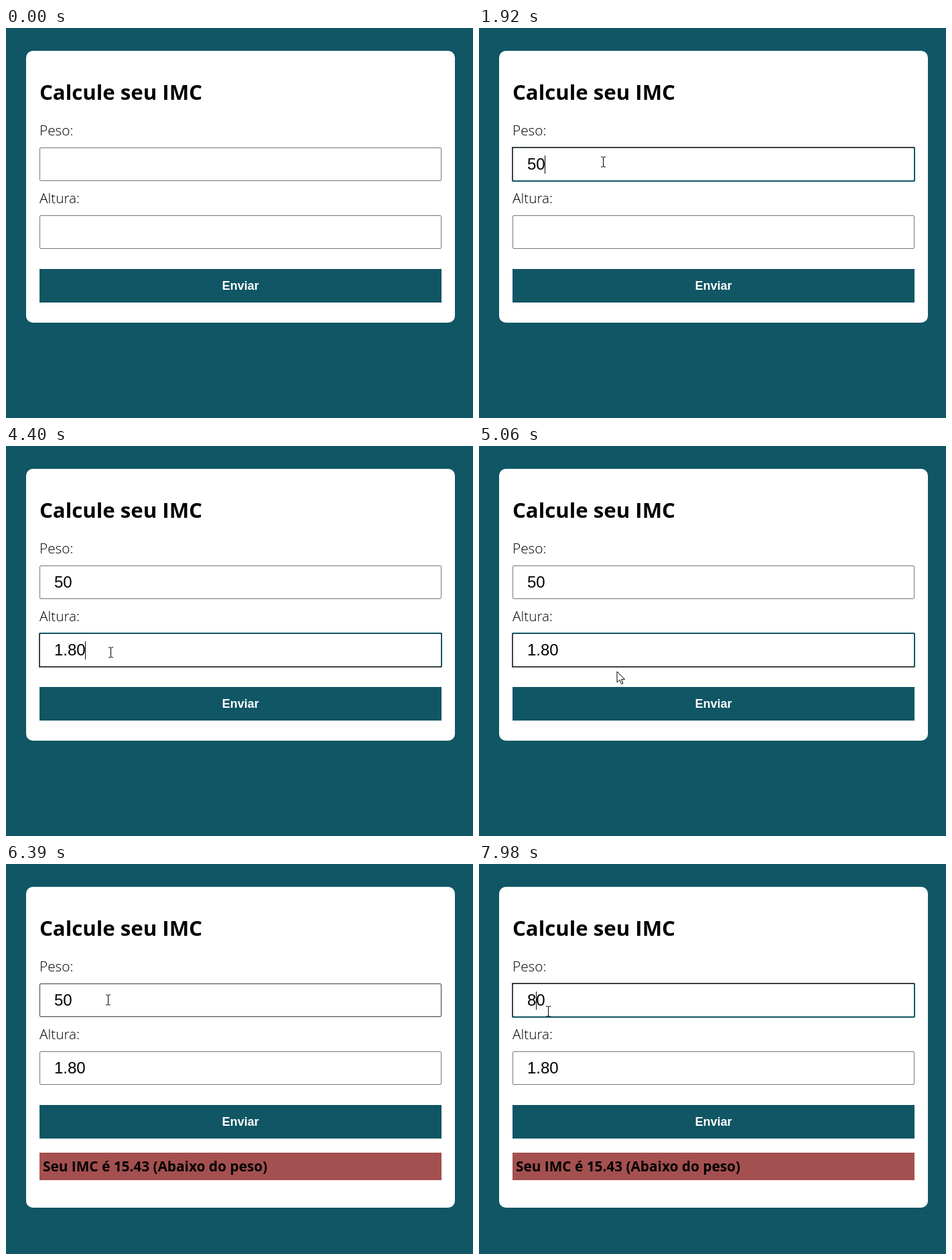
Animation of 697 by 581 pixels, one loop 8000 ms. Source, as an HTML page:

```html
<!DOCTYPE html>
<html lang="pt-BR">
<head>
<meta charset="utf-8">
<title>Calcule seu IMC</title>
<style>
html, body { margin: 0; width: 100%; height: 100%; overflow: hidden; background: #105665; }
svg { display: block; }
text { font: 300 20.8px "Open Sans", sans-serif; white-space: pre; }
text.title { font-size: 31.2px; font-weight: 700; }
text.result { font-weight: 700; }
text.value { font: 24px "Liberation Sans", Arial, sans-serif; }
text.send { font: bold 18px "Liberation Sans", Arial, sans-serif; fill: #fff; text-anchor: middle; }
.popup { filter: drop-shadow(0 1px 2px rgba(0, 0, 0, .35)); }
.popup text { font: 12px "Open Sans", sans-serif; fill: #333; }
.ring { fill: none; stroke-width: 2; }
</style>
</head>
<body>
<svg width="697" height="581" viewBox="0 0 697 581">
  <rect id="card" x="30" y="34" width="640" height="405" rx="10" fill="#fff"/>
  <text class="title" x="50" y="107">Calcule seu IMC</text>
  <text x="50" y="160">Peso:</text>
  <text x="50" y="261">Altura:</text>
  <g id="fields"></g>
  <rect id="caret" width="1" height="27"/>
  <rect id="button" x="50" y="359" width="600" height="50"/>
  <text class="send" x="350" y="390">Enviar</text>
  <g id="result">
    <rect x="50" y="430" width="600" height="41" fill="#a55050"/>
    <text class="result" x="55" y="458">Seu IMC é 15.43 (Abaixo do peso)</text>
  </g>
  <g id="popups"></g>
  <g id="cursor">
    <g id="beam" fill="none">
      <path d="M-3.5-7.5H-1L0-6.5 1-7.5H3.5M0-6.5V6.5M-3.5 7.5H-1L0 6.5 1 7.5H3.5" transform="translate(.5 .5)" stroke="#000"/>
    </g>
    <path id="arrow" d="M0 0V16L4 12.5 6.5 18.5 9 17.5 6.5 11.7H11.5Z" fill="#fff" stroke="#000"/>
    <path id="hand" d="M-1.5 1Q0-1 1.5 1V7.5L3 6.8 4.8 8 6.3 7.6 7.7 9 9.5 9.2V15Q9.5 18 7.5 20V22H-1.5V20L-6 13.5Q-6.5 11.5-4.2 11.5L-1.5 14Z" fill="#fff" stroke="#000"/>
  </g>
</svg>
<script>
const LOOP = 8000, BLINK = 530, TEAL = '#105665';
const $ = id => document.getElementById(id);
const show = (el, on) => el.style.display = on ? '' : 'none';

const tops = [178, 279];

// time, focused field, weight, height, caret index
const events = [
  [0, -1, '', '', 0],
  [720, 0, '', '', 0],
  [1720, 0, '5', '', 1],
  [1860, 0, '50', '', 2],
  [2620, 1, '50', '', 0],
  [3130, 1, '50', '1', 1],
  [3530, 1, '50', '1.', 2],
  [4260, 1, '50', '1.8', 3],
  [4400, 1, '50', '1.80', 4],
  [5400, -1, '50', '1.80', 0],
  [6650, 0, '50', '1.80', 1],
  [7180, 0, '0', '1.80', 0],
  [7920, 0, '80', '1.80', 1]
];

// time, x, y
const path = [
  [260, 250, 491], [560, 215, 330], [800, 175, 203], [990, 172, 198],
  [1720, 172, 198], [1920, 185, 199],
  [2390, 185, 199], [2620, 164, 298], [2850, 156, 307],
  [4930, 156, 307], [5260, 282, 379],
  [5730, 282, 379], [6130, 205, 170], [6390, 152, 202],
  [6460, 152, 202], [7110, 92, 196],
  [7320, 92, 196], [7580, 103, 219]
];

const popups = [
  { from: 720, to: 1720, fadeIn: 200, fadeOut: 200, y: 238, w: 72, items: ['80', '70', '100', '65', '90', '10000'] },
  { from: 2620, to: 3130, fadeIn: 200, fadeOut: 0, y: 339, w: 60, items: ['1', '180', '2', '20', '200', '70'] },
  { from: 3130, to: 3530, fadeIn: 0, fadeOut: 200, y: 339, w: 60, items: ['1', '180'] }
];

$('fields').innerHTML = tops.map((y, i) => `
  <rect id="box${i}" x="50.5" y="${y + .5}" width="599" height="49" rx="1.5" fill="#fff"/>
  <g id="ring${i}" class="ring">
    <rect x="50" y="${y}" width="600" height="50" rx="1" stroke="${TEAL}"/>
    <path d="M50 ${i ? y : y + 50}V${i ? y + 50 : y}H650" stroke="#3c4347"/>
  </g>
  <text id="value${i}" class="value" x="72" y="${y + 33}"></text>`).join('');

$('popups').innerHTML = popups.map(({ y, w, items }) => `
  <g class="popup">
    <rect x="149" y="${y}" width="${w}" height="${items.length * 36 + 8}" rx="3" fill="#fff"/>
    <path d="M161 ${y + 1}L170 ${y - 8} 179 ${y + 1}Z" fill="#fff"/>
    ${items.map((s, i) => `<text x="161" y="${y + 27 + 36 * i}">${s}</text>`).join('')}
  </g>`).join('');

const clamp = v => Math.max(0, Math.min(1, v));
const ramp = (t, start, length) => length ? clamp((t - start) / length) : +(t >= start);

function pointer(t) {
  const i = path.findIndex(p => p[0] > t);
  if (i < 0) return path[path.length - 1].slice(1);
  const [t0, x0, y0] = path[i - 1], [t1, x1, y1] = path[i];
  const k = (t - t0) / (t1 - t0);
  return [x0 + (x1 - x0) * k, y0 + (y1 - y0) * k].map(Math.round);
}

function drawForm(t, hovered) {
  const [since, focus, weight, height, index] = events.filter(e => e[0] <= t).pop();
  const values = [weight, height];
  values.forEach((value, i) => {
    $('value' + i).textContent = value;
    $('box' + i).setAttribute('stroke', hovered === i ? '#3a3a3a' : '#767676');
    show($('ring' + i), focus === i);
  });
  show($('caret'), focus >= 0 && Math.floor((t - since) / BLINK) % 2 === 0);
  if (focus >= 0) {
    const before = [...values[focus].slice(0, index)];
    const x = before.reduce((sum, c) => sum + (c === '.' ? 6.67 : 13.35), 72);
    $('caret').setAttribute('x', Math.floor(x));
    $('caret').setAttribute('y', tops[focus] + 12);
  }
  const sent = t >= 5400;
  show($('result'), sent);
  $('card').setAttribute('height', sent ? 478 : 405);
}

function draw(t) {
  const visible = t >= 260;
  const [x, y] = visible ? pointer(t) : [0, 0];
  const hovered = tops.findIndex(top => y >= top && y < top + 50);
  const onButton = y >= 359 && y < 409;

  drawForm(t, hovered);
  $('button').setAttribute('fill', onButton ? '#0a2e38' : TEAL);

  popups.forEach((p, i) => {
    const alpha = ramp(t, p.from, p.fadeIn) * (1 - ramp(t, p.to, p.fadeOut));
    const el = $('popups').children[i];
    show(el, alpha > 0);
    el.style.opacity = alpha;
  });

  show($('cursor'), visible);
  $('cursor').setAttribute('transform', `translate(${x} ${y})`);
  show($('beam'), hovered >= 0);
  show($('hand'), onButton);
  show($('arrow'), hovered < 0 && !onButton);
}

function tick() {
  draw(performance.now() % LOOP);
  requestAnimationFrame(tick);
}
tick();
</script>
</body>
</html>
```
